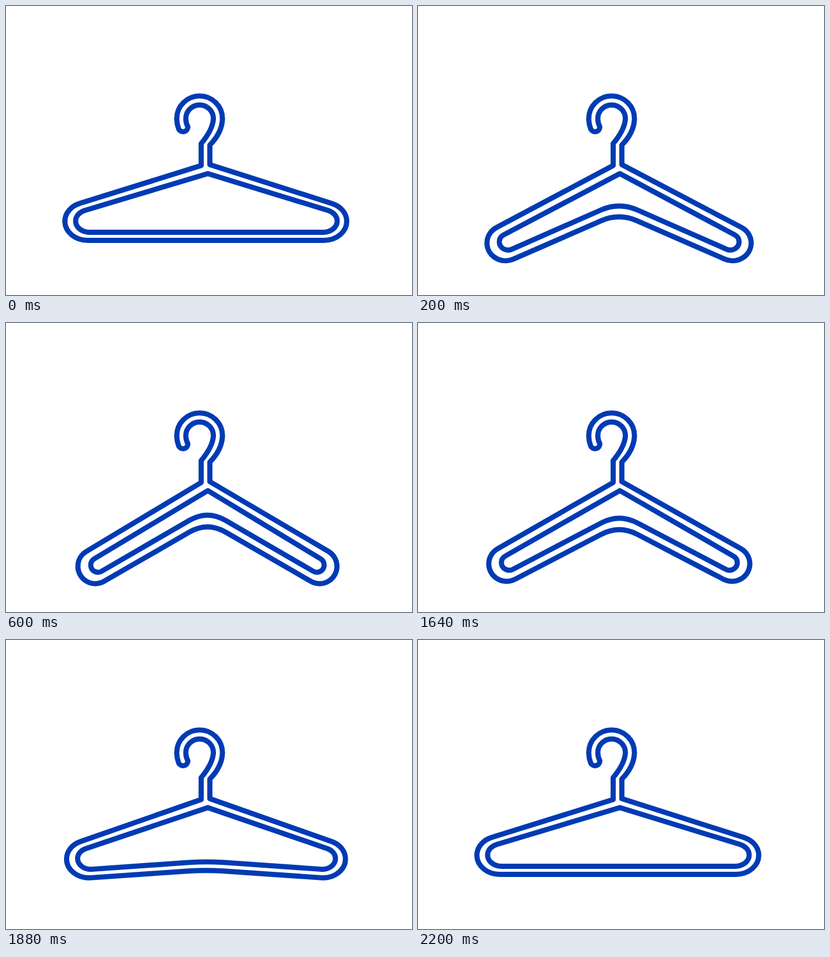
Write an HTML page that moves like this. It is 700x500 px and loops after 3000 ms.

```html
<!DOCTYPE html>
<html lang="en">
<head>
<meta charset="utf-8">
<title>Hanger</title>
<style>
  html, body { margin: 0; width: 100%; height: 100%; overflow: hidden; background: #fff; }
  svg { display: block; width: 100%; height: 100%; }
  path { fill: none; stroke: #003bb4; stroke-width: 8.9; stroke-linejoin: round; }
</style>
</head>
<body>
<svg viewBox="0 0 700 500">
  <path id="outer"/>
  <path id="inner"/>
</svg>
<script>
const LOOP = 3000, STEP = 40, MOVE = 600, BACK = 1600;
const BEND = 31; // half width of the rounded bend under the neck

// Each arm ends in an elliptical tip; every value goes from flat to bent.
const outer = {
  rootL: [336.5, 276], rootR: [351.5, 274.5],
  flat: { axis: 344.5, x: 141, y: 372.5, rx: 39.5, ry: 33, bend: 405.5 },
  bent: { axis: 347.3, x: 154, y: 421, rx: 30, ry: 30, bend: 361.7 }
};
const inner = {
  rootL: [348, 290], rootR: [348, 290],
  flat: { axis: 345.5, x: 144, y: 372, rx: 24, ry: 19.5, bend: 391.5 },
  bent: { axis: 347.3, x: 158.6, y: 418.7, rx: 12.5, ry: 12.5, bend: 341.4 }
};

const ring = { x: 333.8, y: 195, out: 39.4, in: 23.8 };
const arc = (rx, ry, to, sweep = 0) => `A${rx} ${ry} 0 0 ${sweep} ${to} `;

function hookPath() {
  const { x, y, out, in: r } = ring;
  return `L351.5 274.5 V240.5 Q372.5 219 ${x + out} ${y} ` +
    arc(out, out, [x - out, y]) + 'Q294.3 204 297.8 213 ' +
    arc(8.3, 8.3, [313.5, 209]) + `Q310 202 ${x - r} ${y} ` +
    arc(r, r, [x + r, y], 1) + 'Q356.5 214 336.5 238 Z';
}

// Point where a line from (px, py) touches the ellipse, on the chosen side.
function touch([px, py], { x, y, rx, ry }, side) {
  const u = (px - x) / rx, v = (py - y) / ry;
  const a = Math.atan2(v, u) + side * Math.acos(1 / Math.hypot(u, v));
  return [x + rx * Math.cos(a), y + ry * Math.sin(a)];
}

function body({ rootL, rootR, flat, bent }, p) {
  const tip = {};
  for (const key in flat) tip[key] = flat[key] + (bent[key] - flat[key]) * p;
  const { axis, x, y, rx, ry, bend } = tip;
  const tipR = { ...tip, x: 2 * axis - x };
  const kneeL = [axis - BEND, bend], kneeR = [axis + BEND, bend];
  const underL = touch(kneeL, tip, 1), underR = touch(kneeR, tipR, -1);
  const slope = (bend - underL[1]) / (kneeL[0] - underL[0]);
  const round = to => arc(rx, ry, to);
  return `M${rootL} L${touch(rootL, tip, -1)} ` +
    round([x - rx, y]) + round(underL) +
    `L${kneeL} Q${axis} ${bend + slope * BEND} ${kneeR} L${underR} ` +
    round([tipR.x + rx, y]) + round(touch(rootR, tipR, 1));
}

// Cubic bezier easing with handles (x1, 0.1) and (0, 1).
function ease(x, x1) {
  if (x <= 0) return 0;
  if (x >= 1) return 1;
  let lo = 0, hi = 1;
  for (let i = 0; i < 30; i++) {
    const s = (lo + hi) / 2;
    if (3 * (1 - s) ** 2 * s * x1 + s ** 3 < x) lo = s; else hi = s;
  }
  return 0.3 * (1 - lo) ** 2 * lo + 3 * (1 - lo) * lo ** 2 + lo ** 3;
}

const hook = hookPath();
const setPath = (id, d) => document.getElementById(id).setAttribute('d', d);

function draw(time) {
  const t = Math.floor((time % LOOP) / STEP + 1e-6) * STEP;
  const p = t < BACK ? ease(t / MOVE, 0.12) : 1 - ease((t - BACK) / MOVE, 0.2);
  setPath('outer', body(outer, p) + hook);
  setPath('inner', body(inner, p) + 'Z');
}

const start = performance.now();
function tick() {
  draw(performance.now() - start);
  requestAnimationFrame(tick);
}
tick();
</script>
</body>
</html>
```
